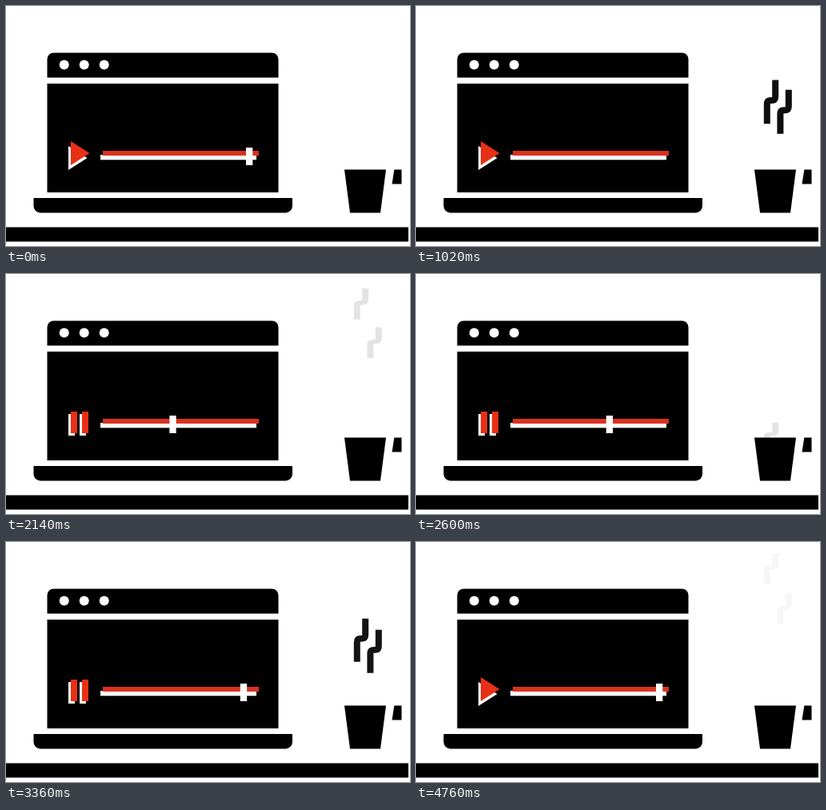
Write an HTML page that moves like this. It is 505 px wide and 300 px high and loops after 4960 ms.

```html
<!DOCTYPE html>
<html lang="en">
<head>
<meta charset="utf-8">
<title>Laptop player and coffee</title>
<style>
  html, body { margin: 0; width: 100%; height: 100%; overflow: hidden; background: #fff; }
  svg { display: block; }
  .white { fill: #fff; }
  .red { fill: #e83016; }
</style>
</head>
<body>
<svg width="505" height="300" viewBox="0 0 505 300">
  <defs>
    <path id="wisp" d="M449.2 0V21Q449.2 25.5 444.5 25.5H443.5Q438.8 25.5 438.8 30V55" fill="none" stroke="#000" stroke-width="8"/>
    <path id="playShape" d="M81 169V199L104.5 184Z"/>
    <path id="pauseShape" d="M81 172h8v27h-8zM95 172h8v27h-8z"/>
  </defs>

  <!-- steam, hidden below the rim of the cup -->
  <svg width="505" height="205">
    <g id="steam">
      <use id="left" href="#wisp"/>
      <use id="right" href="#wisp"/>
    </g>
  </svg>

  <!-- laptop, table, cup -->
  <path d="M51.5 89.5V66.5a8 8 0 0 1 8-8H332.5a8 8 0 0 1 8 8V89.5Z"/>
  <path d="M51.5 97H340.5V233H51.5Z"/>
  <path d="M34.5 240H358V250a8.5 8.5 0 0 1-8.5 8.5H43a8.5 8.5 0 0 1-8.5-8.5Z"/>
  <path d="M0 276.5H503V294.5H0Z"/>
  <path d="M423 204.5H475L468 258.5H430Z"/>
  <path d="M485.3 204.5H494.5V222.5H482.5Z"/>
  <g class="white">
    <circle cx="72.7" cy="73.6" r="6"/>
    <circle cx="97.7" cy="73.6" r="6"/>
    <circle cx="122.7" cy="73.6" r="6"/>
  </g>

  <!-- player controls -->
  <g id="play">
    <use href="#playShape" class="white" x="-3" y="6"/>
    <use href="#playShape" class="red"/>
  </g>
  <g id="pause">
    <use href="#pauseShape" class="white" x="-3" y="3"/>
    <use href="#pauseShape" class="red"/>
  </g>
  <rect class="white" x="118" y="186" width="195" height="6.3"/>
  <rect x="121" y="181" width="195" height="6" fill="#d93220"/>
  <rect id="knob" class="white" y="177" width="8.3" height="22"/>
</svg>

<script>
const LOOP = 4960, LAST = 4760, PUFF = 2500;
const START = 1040, STOP = 3780;
const KNOB_END = 300, KNOB_ARRIVES = 3460, KNOB_SPEED = 0.0725;

const el = id => document.getElementById(id);
const show = (id, on) => el(id).setAttribute('visibility', on ? 'visible' : 'hidden');
const clamp = v => Math.min(1, Math.max(0, v));
const smooth = (t, from, to) => {
  const p = clamp((t - from) / (to - from));
  return p * p * (3 - 2 * p);
};

function drawSteam(t) {
  const below = clamp(1 - t / 1150) ** 2.5;
  const lift = smooth(t, 1130, 2300);
  const scale = 1 - 0.55 * below - 0.31 * lift;
  const place = (id, x, rest, rise, drift) => el(id).setAttribute('transform',
    `translate(${x} ${rest + rise * below - drift * lift}) scale(1 ${scale})`);
  place('left', 0, 92, 118, 78);
  place('right', 16.6, 104, 183, 39.5);
  el('steam').setAttribute('opacity', Math.min(t / 940, 0.94, 1 - smooth(t, 1150, 2390)));
}

function draw(time) {
  const t = Math.min(time % LOOP, LAST);
  const playing = t >= START && t < STOP;
  show('pause', playing);
  show('play', !playing);
  show('knob', t < 1000 || t >= START);
  const travel = KNOB_SPEED * Math.max(0, KNOB_ARRIVES - t);
  el('knob').setAttribute('x', t < START ? KNOB_END : KNOB_END - travel);
  drawSteam(t % PUFF);
}

const begin = performance.now();
(function tick() {
  draw(performance.now() - begin);
  requestAnimationFrame(tick);
})();
</script>
</body>
</html>
```
